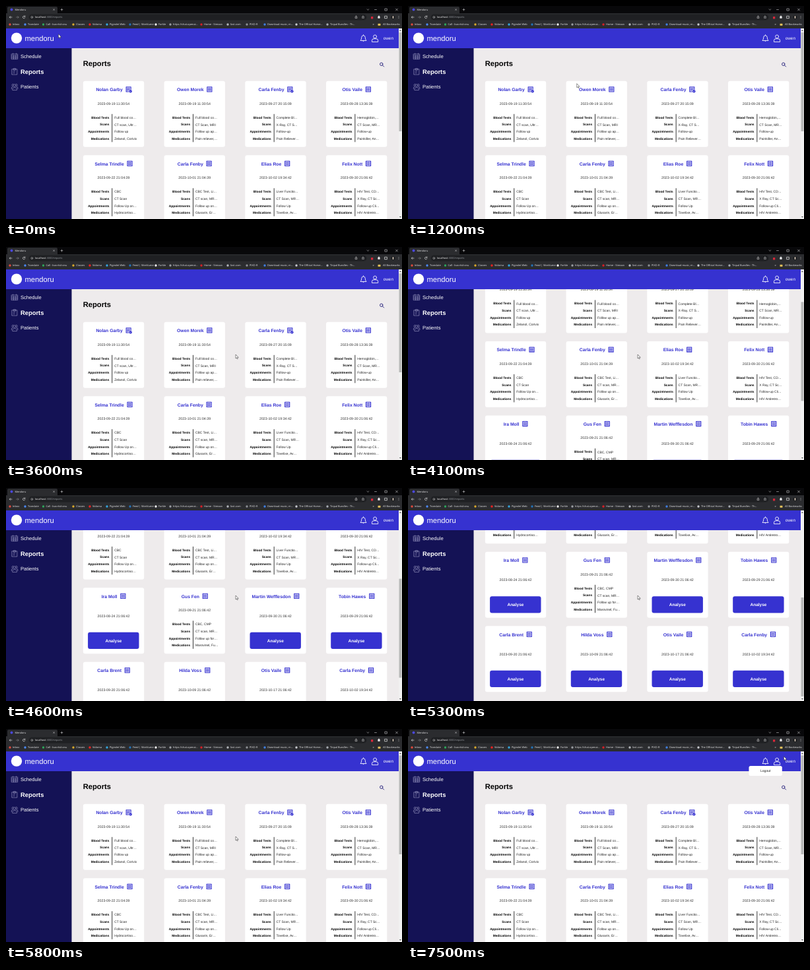
An HTML page for the animation above (7.6 s loop, 600 px wide and 323 px high).

```html
<!DOCTYPE html>
<html lang="en">
<head>
<meta charset="utf-8">
<title>Mendoru</title>
<style>
  html, body { margin: 0; width: 100%; height: 100%; overflow: hidden; background: #eeebec; }
  svg { display: block; width: 600px; height: 323px; }
  text { font-family: "Liberation Sans", Arial, sans-serif; text-rendering: geometricPrecision; white-space: pre; }
  .ui text { font-family: "Open Sans", "Noto Sans", sans-serif; }
  .b { font-weight: bold; }
  .line { fill: none; stroke-linecap: round; stroke-linejoin: round; }
</style>
</head>
<body>
<svg id="stage" viewBox="0 0 600 323"></svg>
<script>
const BLUE = '#3632d0', NAVY = '#141255', MAX_SCROLL = 242;

// Shape helpers; text is placed by its vertical centre.
const text = (x, y, s, size, fill, { anchor = 'start', cls = '' } = {}) =>
  `<text x="${x}" y="${y + size * 0.36}" font-size="${size}" fill="${fill}" text-anchor="${anchor}" class="${cls}">${s}</text>`;
const rect = (x, y, w, h, fill, r = 0) =>
  `<rect x="${x}" y="${y}" width="${w}" height="${h}" rx="${r}" fill="${fill}"/>`;
const dot = (x, y, r, fill) => `<circle cx="${x}" cy="${y}" r="${r}" fill="${fill}"/>`;
const line = (d, color, width = 0.7) =>
  `<path class="line" d="${d}" stroke="${color}" stroke-width="${width}"/>`;

// Name, date, then blood tests, scans, appointments and medications if analysed.
const reports = [
  ['Nolan Garby', '2023-09-19 11:30:54', 'Full blood co…', 'CT scan, Ultr…', 'Follow up', 'Zelanol, Corivix'],
  ['Owen Morek', '2023-09-19 11:30:54', 'Full blood co…', 'CT Scan, MRI', 'Follow up ap…', 'Pain reliever,…'],
  ['Carla Fenby', '2023-09-27 20:15:09', 'Complete Bl…', 'X-Ray, CT S…', 'Follow-up', 'Pain Reliever…'],
  ['Otis Vaile', '2023-09-28 13:36:39', 'Hemoglobin,…', 'CT Scan, MR…', 'Follow-up', 'Painkiller, An…'],
  ['Selma Trindle', '2023-09-22 21:04:39', 'CBC', 'CT Scan', 'Follow Up on…', 'Hydrocortiso…'],
  ['Carla Fenby', '2023-10-01 21:04:39', 'CBC Test, Li…', 'CT scan, MR…', 'Follow up on…', 'Glusarin, Er…'],
  ['Elias Roe', '2023-10-02 19:34:42', 'Liver Functio…', 'CT Scan, MR…', 'Follow Up', 'Tovelixe, Av…'],
  ['Felix Nott', '2023-09-30 21:06:42', 'HIV Test, CD…', 'X Ray, CT Sc…', 'Follow-up Cli…', 'HIV Antiretro…'],
  ['Ira Moll', '2023-08-24 21:06:42'],
  ['Gus Fen', '2023-09-21 21:06:42', 'CBC, CMP', 'CT scan, MR…', 'Follow up for…', 'Marovinel, Fu…'],
  ['Martin Wefflesdon', '2023-09-30 21:06:42'],
  ['Tobin Hawes', '2023-09-29 21:06:42'],
  ['Carla Brent', '2023-09-20 21:06:42'],
  ['Hilda Voss', '2023-10-09 21:06:42'],
  ['Otis Vaile', '2023-10-17 21:06:42'],
  ['Carla Fenby', '2023-10-02 19:34:42'],
];
const labels = ['Blood Tests', 'Scans', 'Appointments', 'Medications'];

function listIcon(checked) {
  const box = line('M.5 .4H7.6V7.6H.5Z', BLUE, 1.1) + line('M1.8 2.3H6.2M1.8 4H6.2M1.8 5.7H6.2', BLUE, 1);
  const badge = dot(6.9, 6.8, 2.8, '#fff') + dot(7, 6.9, 2.3, BLUE) + line('M5.9 6.9L6.7 7.7L8.1 6.2', '#fff', 0.5);
  return `<g class="icon">${box}${checked ? badge : ''}</g>`;
}

function card([name, date, ...values], i) {
  const x = 116.9 + (i % 4) * 122.7, y = 113.8 + Math.floor(i / 4) * 112.5;
  const done = values.length > 0;
  let body = rect(0, 0, 92.3, 100, '#fff', 3)
    + text(0, 12.8, name, 6.8, BLUE, { cls: 'b name' }) + listIcon(i === 0 || i === 2)
    + text(46.1, done ? 33.9 : 42.7, date, 5.25, '#333', { anchor: 'middle' });
  if (done) {
    body += rect(43.4, 50, 0.9, 42.5, '#222');
    values.forEach((v, k) => {
      const row = 55.3 + k * 10.65;
      body += text(39.5, row, labels[k], 4.8, '#000', { anchor: 'end', cls: 'b' }) + text(47.3, row, v, 4.95, '#222');
    });
  } else {
    body += rect(7.2, 67.4, 77.4, 25.2, BLUE, 3)
      + text(46, 80, 'Analyse', 6.5, '#fff', { anchor: 'middle', cls: 'b' });
  }
  return `<g class="card" transform="translate(${x} ${y})">${body}</g>`;
}

function page() {
  return `<g id="page">${text(116.7, 87, 'Reports', 11.2, '#000', { cls: 'b' })}
    ${line('M571 88.2a2.2 2.2 0 1 1-4.4 0a2.2 2.2 0 1 1 4.4 0M570.5 89.9L572.6 92', '#25217c', 0.95)}
    ${reports.map(card).join('')}</g>`;
}

function sidebar() {
  const ink = '#b3b1d6';
  return rect(0, 63, 99.5, 260, NAVY)
    + line('M8.5 72.8H17.7V80.6H8.5ZM8.5 75H17.7M8.5 77H17.7M8.5 78.8H17.7M11.5 75V80.6M14.7 75V80.6M10.7 71.7V73.4M15.5 71.7V73.4', ink, 0.5)
    + text(22, 76.3, 'Schedule', 7.6, '#fff')
    + line('M9.2 95.8H16.8V104H9.2ZM11.3 96.7V94.8H14.7V96.7ZM11 99H13.5M11 101.4H13', ink, 0.55)
    + text(22, 99.6, 'Reports', 9.4, '#fff', { cls: 'b' })
    + line('M14.9 120.5a1.8 1.8 0 1 1-3.6 0a1.8 1.8 0 1 1 3.6 0M9.8 127.2V125.6Q9.8 123.6 13.1 123.6T16.4 125.6V127.2ZM10.6 121.5A1.6 1.6 0 1 1 11.2 118.4M15.6 121.5A1.6 1.6 0 1 0 15 118.4M8.4 125.5V124Q8.4 122.6 10 122.4M17.8 125.5V124Q17.8 122.6 16.2 122.4', ink, 0.55)
    + text(22, 122.7, 'Patients', 7.6, '#fff');
}

function header() {
  return rect(0, 34, 595, 30, BLUE)
    + dot(16, 48.6, 8.2, '#fff')
    + text(28.5, 48.9, 'mendoru', 11.2, '#fff')
    + line('M537.3 52.2Q538.7 51 538.7 47.8Q538.7 44.7 541.5 44.7T544.3 47.8Q544.3 51 545.7 52.2ZM541.5 44.7V43.7M540.3 52.6Q541.5 55 542.7 52.6', '#fff', 0.85)
    + line('M561.6 46.4a2.5 2.5 0 1 1-5 0a2.5 2.5 0 1 1 5 0M554.5 54V52.4Q554.5 49.7 557.2 49.7H561Q563.7 49.7 563.7 52.4V54Z', '#fff', 0.85)
    + text(571.7, 48.9, 'owen', 6.4, '#fff')
    + `<g id="menu">${rect(516.5, 56, 50.3, 15, '#fff', 2.5)}${text(541.7, 63.6, 'Logout', 5.1, '#222', { anchor: 'middle' })}</g>`;
}

const scrollbar = () => rect(595, 34, 5, 289, '#f1f1f1')
  + '<path d="M596 38L597.4 36L598.8 38ZM596 319L597.4 321L598.8 319Z" fill="#555"/>'
  + `<g id="thumb">${rect(595.5, 40, 4, 150, '#b8b8b8')}</g>`;

// Icon x, icon colour, label.
const bookmarks = [
  [6, '#e34a3c', 'Inbox'], [29, '#4c8bf5', 'Translate'], [56.5, '#2ea55a', 'Call - bva-rkd-onu'],
  [102, '#d9a92c', 'Classes'], [127, '#f02020', 'Vidorna'], [153, '#35a5dc', 'Pigeolet Web'],
  [188, '#2472b8', 'Feed | Worklume'], [227, '#f2f2f2', 'Forkle'], [249, '#9a9da2', 'https://chat.openai…'],
  [296, '#d81f26', 'Home - Streavo'], [336, '#b4b7bc', 'fast.com'], [365, '#8c8f94', 'PIXO-R'],
  [392, '#3f7fe0', 'Download music, m…'], [440, '#c9cbd0', 'The Official Home…'], [487, '#a9adb4', 'Tinpal Bundles - Th…'],
];

function browser() {
  const ink = '#ececee', size = 3.9, bar = '#2b2c2f';
  return '<g class="ui">' + rect(0, 0, 600, 12, '#08080a')
    + rect(2, 1, 76, 14, bar, 2) + rect(0, 11, 600, 23, bar)
    + dot(8.5, 5.6, 2, '#4b48e0') + text(13.5, 5.6, 'Mendoru', size, ink)
    + line('M71.7 4.6L73.5 6.4M73.5 4.6L71.7 6.4M83 5.5H86M84.5 4V7', ink, 0.5)
    + line('M547 4.8L548.4 6.1L549.8 4.8M558.5 5.5H561.5M574.3 4H577.3V7H574.3ZM590.5 4L593.5 7M593.5 4L590.5 7', ink, 0.5)
    + line('M9 17H5.3M6.8 15.5L5.3 17L6.8 18.5', ink, 0.6)
    + line('M15.5 17H19.2M17.7 15.5L19.2 17L17.7 18.5', '#86888c', 0.6)
    + line('M28.7 16A1.8 1.8 0 1 0 28.8 17.8M28.9 14.9V16.2H27.6', ink, 0.6)
    + rect(34.5, 12.6, 512, 8.8, '#1f2023', 4.4)
    + line('M40.8 17a1.5 1.5 0 1 1-3 0a1.5 1.5 0 1 1 3 0M39.3 16.8V17.7', ink, 0.4)
    + text(44, 17, 'localhost<tspan fill="#9a9ea4">:3000/reports</tspan>', 3.95, '#fff')
    + line('M529 16.4V18.6H532V16.4M530.5 17.6V14.9M529.7 15.7L530.5 14.9L531.3 15.7', ink, 0.45)
    + line('M541 15L541.6 16.4L543 16.5L541.9 17.4L542.3 18.8L541 18L539.7 18.8L540.1 17.4L539 16.5L540.4 16.4Z', ink, 0.4)
    + rect(553, 16, 3.2, 3.4, '#d6283a', 0.5)
    + rect(563.4, 15.6, 3.2, 3.2, ink, 0.6) + dot(565, 15.4, 0.8, ink)
    + line('M574 15.3H577.4V18.7H574Z', ink, 0.7)
    + dot(586.5, 17, 2.7, '#17181a') + rect(585.6, 15, 1.8, 4, '#d2c4b6', 0.8)
    + [15.4, 17, 18.6].map(y => dot(595, y, 0.45, ink)).join('')
    + bookmarks.map(([x, color, label]) => dot(x, 28, 1.7, color) + text(x + 4, 28, label, size, ink)).join('')
    + text(555.5, 27.7, '»', 4.5, ink)
    + rect(563.5, 26.7, 4, 3, '#e5c25b', 0.4)
    + text(571, 28, 'All Bookmarks', size, ink) + '</g>';
}

const cursor = '<path id="cursor" d="M0 0V6L1.4 4.8L2.3 6.8L3.3 6.4L2.4 4.4H4.2Z" fill="#fff" stroke="#222" stroke-width=".5"/>';

const stage = document.getElementById('stage');
stage.innerHTML = rect(0, 0, 600, 323, '#eeebec') + page() + sidebar() + header() + scrollbar() + browser() + cursor;

// Centre every name together with its icon.
for (const c of stage.querySelectorAll('.card')) {
  const name = c.querySelector('.name'), width = name.getComputedTextLength();
  const x = 46.1 - (width + 12.8) / 2;
  name.setAttribute('x', x);
  c.querySelector('.icon').setAttribute('transform', `translate(${x + width + 4.8} 8.6)`);
}

const ease = p => p * p * (3 - 2 * p);

// Value of a track of [time, ...values] keys at time t.
function at(track, t, curve = p => p) {
  const i = track.findIndex(k => k[0] > t);
  if (i < 0) return track[track.length - 1].slice(1);
  const [t0, ...a] = track[i - 1], [t1, ...b] = track[i];
  const p = curve((t - t0) / (t1 - t0));
  return a.map((v, k) => v + (b[k] - v) * p);
}

const pointer = [[0, 79.5, 42.5], [500, 79.5, 42.5], [1700, 362, 163], [2500, 362, 163],
  [3200, 348, 163], [6100, 348, 163], [7000, 569.5, 41.5]];
const scroll = [[0, 0], [3700, 0], [4600, 187.5], [4900, MAX_SCROLL], [5350, MAX_SCROLL], [5750, 0]];

const [pageEl, thumb, menu, arrow] = ['page', 'thumb', 'menu', 'cursor'].map(id => document.getElementById(id));

function draw(now) {
  const t = Math.floor(now % 7600 / 100) * 100;
  const [top] = at(scroll, t), [x, y] = at(pointer, t, ease);
  pageEl.setAttribute('transform', `translate(0 ${-top})`);
  thumb.setAttribute('transform', `translate(0 ${top / MAX_SCROLL * 126})`);
  arrow.setAttribute('transform', `translate(${x} ${y})`);
  menu.setAttribute('visibility', t >= 7000 ? 'visible' : 'hidden');
  requestAnimationFrame(draw);
}
draw(performance.now());
</script>
</body>
</html>
```
